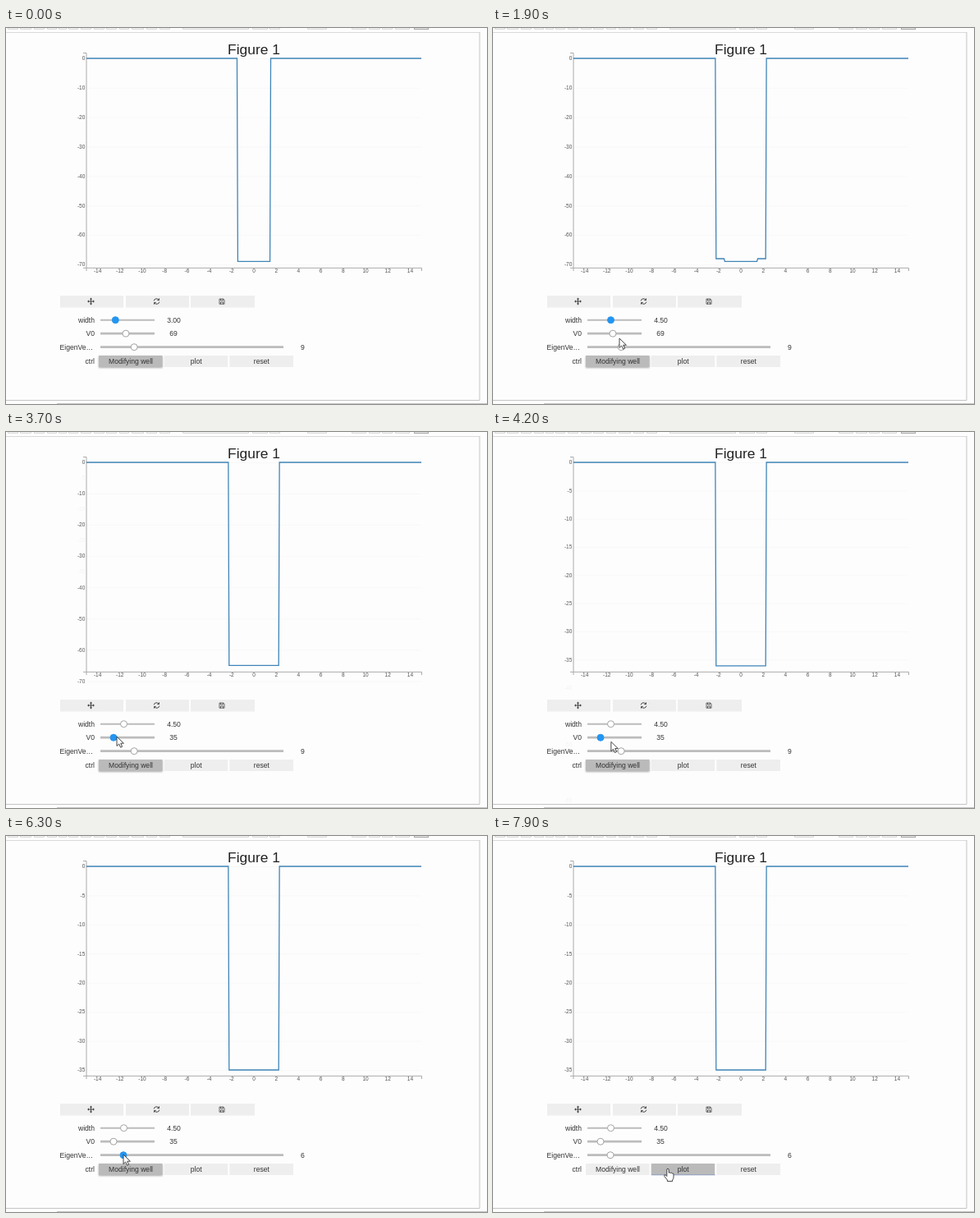
Write an HTML page that moves like this. It is 586 px wide and 458 px high and loops after 8 s.

```html
<!DOCTYPE html>
<html lang="en">
<head>
<meta charset="utf-8">
<title>Well widget</title>
<style>
  html, body { margin: 0; width: 100%; height: 100%; overflow: hidden; background: #fdfdfd; }
  svg { display: block; width: 586px; height: 458px; font-family: "Liberation Sans", Arial, sans-serif; }
  .tick { font-size: 6.5px; fill: #555; }
  .axis { fill: none; stroke: #aaa; }
  .frame { fill: none; stroke: #c4c4c4; }
  .ui { font-size: 8.6px; fill: #333; }
  .track { stroke: #bcbcbc; }
  .thumb { stroke: #a4a4a4; }
  .icon { fill: none; stroke: #444; stroke-width: 1; }
  .mid { text-anchor: middle; }
  .end { text-anchor: end; }
</style>
</head>
<body>
<svg id="stage" viewBox="0 0 586 458">
  <rect width="586" height="458" fill="#fdfdfd"/>
  <g id="topbar" fill="none" stroke="#d0d0d0"></g>
  <path class="frame" d="M0 5.5H577" stroke-opacity=".6"/>
  <path class="frame" d="M577 5V453.5H0M62 457.5H586"/>

  <text class="mid" x="302" y="31.7" font-size="17.4" fill="#222">Figure 1</text>
  <g id="yTicks"></g>
  <path class="axis" d="M94 30.5H98V292.3H94M98 296V292.3H506.5V296"/>
  <g id="xTicks"></g>
  <path id="well" fill="none" stroke="#4085b8" stroke-width="1.3"/>

  <g fill="#eee">
    <rect x="66" y="326" width="77" height="14.5"/>
    <rect x="146" y="326" width="77" height="14.5"/>
    <rect x="225" y="326" width="78" height="14.5"/>
  </g>
  <path class="icon" d="M100 333H107M103.5 329.5V336.5"/>
  <path fill="#444" d="M103.5 328.6L105.2 330.6H101.8ZM103.5 337.4L105.2 335.4H101.8ZM99.1 333L101.1 331.3V334.7ZM107.9 333L105.9 331.3V334.7Z"/>
  <path class="icon" d="M180.2 332.3A3.2 3.2 0 0 1 186 331.2M186.5 329.4V331.6H184.3M186.8 333.7A3.2 3.2 0 0 1 181 334.8M180.5 336.6V334.4H182.7"/>
  <path class="icon" style="stroke-width:.8" d="M260 330H264.8L266 331.2V336.2H260ZM261.5 330V332H264.3V330M261.5 336.2V334H264.6V336.2"/>

  <g class="ui">
    <text class="end" x="108" y="358.8">width</text>
    <text class="end" x="108" y="375">V0</text>
    <text class="end" x="106.2" y="391.5">EigenVe…</text>
    <text class="end" x="108" y="408.8">ctrl</text>
  </g>
  <path class="track" d="M115 355.7H181" stroke-width="2"/>
  <path class="track" d="M115 372.2H181M115 388.7H338" stroke-width="2.8"/>
  <g id="sliders"></g>
  <g id="buttons"></g>

  <path id="arrow" d="M0 0V11.5L2.7 9L4.6 13.2L6.6 12.3L4.8 8.2H8.4Z" fill="#fff" stroke="#333" stroke-width=".9"/>
  <path id="hand" d="M-1.2 8V1Q0 -.8 1.2 1V5.2Q2.4 4.4 3.3 5.5Q4.5 4.8 5.3 6Q6.8 5.5 7 7.2V10.5Q6.8 13 5.6 14V15.6H-.6V14L-4.3 9.3Q-4.6 7.3 -2.8 7.8L-1.2 9.5Z" fill="#fff" stroke="#333" stroke-width=".9"/>
</svg>
<script>
const LOOP = 8000, STEP = 100;
const byId = id => document.getElementById(id);
const clamp = v => Math.max(0, Math.min(1, v));
const lerp = (a, b, k) => a + (b - a) * k;
const cubic = k => k < .5 ? 4 * k ** 3 : 1 - 4 * (1 - k) ** 3;
const smooth = k => k * k * (3 - 2 * k);
const phase = (t, start, end) => clamp((t - start) / (end - start));

function set(node, attrs) {
  for (const key in attrs) node.setAttribute(key, attrs[key]);
}
function add(parent, tag, attrs, text = '') {
  const node = document.createElementNS('http://www.w3.org/2000/svg', tag);
  set(node, attrs);
  node.textContent = text;
  return parent.appendChild(node);
}

// Lower edges of the cropped notebook toolbar: [x, width]
[[2, 12], [17, 13], [34, 12], [50, 11], [64, 9], [76, 11], [91, 12], [107, 12],
 [122, 12], [138, 11], [153, 14], [171, 12], [187, 12], [215, 80], [300, 18],
 [321, 12], [367, 23], [421, 17], [442, 13], [458, 12], [474, 17]]
  .forEach(([x, w]) => add(byId('topbar'), 'path', { d: `M${x}.5 0V1.2H${x + w}.5V0` }));
add(byId('topbar'), 'rect', { x: 497.5, y: -3, width: 17, height: 4.5, fill: '#e4e4e4', stroke: '#aaa' });

const CENTER = 302, UNIT = 13.6, TOP = 37;
for (let v = -14; v <= 14; v += 2) {
  const x = CENTER + v * UNIT;
  add(byId('xTicks'), 'text', { class: 'tick mid', x, y: 298.2 }, v);
}

const yTicks = [];
for (let v = 0; v <= 70; v += 5) {
  const g = add(byId('yTicks'), 'g', {});
  add(g, 'path', { d: 'M99 .5H506', stroke: '#f8f8f8' });
  add(g, 'text', { class: 'tick end', x: 96.3, y: 2.3 }, v ? -v : 0);
  yTicks.push({ v, g, before: v % 10 === 0, after: v <= 35 });
}

const sliders = [[355.7, 204.5], [372.2, 204], [388.7, 361.5]].map(([y, labelX]) => ({
  thumb: add(byId('sliders'), 'circle', { class: 'thumb', cy: y }),
  label: add(byId('sliders'), 'text', { class: 'ui mid', x: labelX, y: y + 3 })
}));

const buttons = ['Modifying well', 'plot', 'reset'].map((name, i) => {
  const x = 113 + i * 79.7;
  const box = add(byId('buttons'), 'rect', { x, y: 399, width: 77.5, height: 14 });
  add(byId('buttons'), 'text', { class: 'ui mid', x: x + 39, y: 408.8 }, name);
  return box;
});
const underline = add(byId('buttons'), 'path', { d: 'M193 412.8H270.5', stroke: '#8d9fc0' });

// Pointer stops: [time, x, y]
const route = [
  [400, 134, 358], [600, 134, 359], [1000, 145, 360], [1300, 145, 360], [1900, 154, 378],
  [2400, 149, 374], [2800, 147, 372], [3400, 135, 371], [3900, 135, 371], [4700, 163, 391],
  [5000, 163, 391], [5300, 157, 389], [6000, 143, 388], [6600, 143, 388],
  [7400, 213, 405], [8000, 213, 405]
];
function pointer(t) {
  const i = Math.max(1, route.findIndex(stop => stop[0] > t));
  const [a, b] = [route[i - 1], route[i]];
  const k = smooth(phase(t, a[0], b[0]));
  return [lerp(a[1], b[1], k), lerp(a[2], b[2], k)];
}

function drawWell(t) {
  const widen = cubic(phase(t, 1000, 2060));
  const rescale = cubic(phase(t, 3450, 4450));
  const floor = lerp(284.4, 285, rescale);
  const shelf = lerp(TOP, floor, widen);
  const side = s => [[2.29, TOP], [2.22, shelf], [1.51, shelf], [1.44, floor]]
    .map(([x, y]) => `${CENTER + s * x * UNIT} ${y}`);
  const points = ['98 37', ...side(-1), ...side(1).reverse(), '506 37'];
  set(byId('well'), { d: 'M' + points.join('L') });

  for (const { v, g, before, after } of yTicks) {
    const y = TOP + v * lerp(3.586, 7.086, rescale);
    set(g, { transform: `translate(0 ${y})`, opacity: lerp(+before, +after, rescale) });
  }
}

function drawControls(t) {
  const drag = (from, to, start, end) => Math.round(lerp(from, to, smooth(phase(t, start, end))));
  const width = drag(30, 45, 600, 1000) / 10;
  const depth = drag(69, 35, 2800, 3400);
  const level = drag(9, 6, 5300, 6000);
  const focus = t < 2800 ? 0 : t < 5300 ? 1 : t < 7500 ? 2 : -1;
  const held = t >= 500 && t < 1300;
  const states = [
    [112.9 + 6.8 * width, width.toFixed(2)],
    [115.6 + .44 * depth, depth],
    [116.8 + 4.37 * level, level]
  ];
  sliders.forEach(({ thumb, label }, i) => {
    const blue = i === focus;
    set(thumb, {
      cx: states[i][0], r: i === 0 && held ? 4.9 : 4,
      fill: blue ? '#2196f3' : '#fff', style: blue ? 'stroke:#2b95ea' : ''
    });
    label.textContent = states[i][1];
  });

  const active = t < 7600 ? 0 : 1;
  buttons.forEach((box, i) => set(box, {
    fill: i === active ? '#bababa' : '#eee',
    style: i === active && i === 0 ? 'filter:drop-shadow(0 1px 1px #aaa)' : ''
  }));
  set(underline, { opacity: active });
}

function drawPointer(t) {
  const [x, y] = pointer(t);
  const overButton = t >= 7200;
  const transform = `translate(${x} ${y})`;
  set(byId('arrow'), { transform, opacity: +(t >= 400 && !overButton) });
  set(byId('hand'), { transform, opacity: +overButton });
}

function render(now) {
  const t = Math.floor((now % LOOP) / STEP) * STEP;
  drawWell(t);
  drawControls(t);
  drawPointer(t);
  requestAnimationFrame(render);
}
render(0);
</script>
</body>
</html>
```
